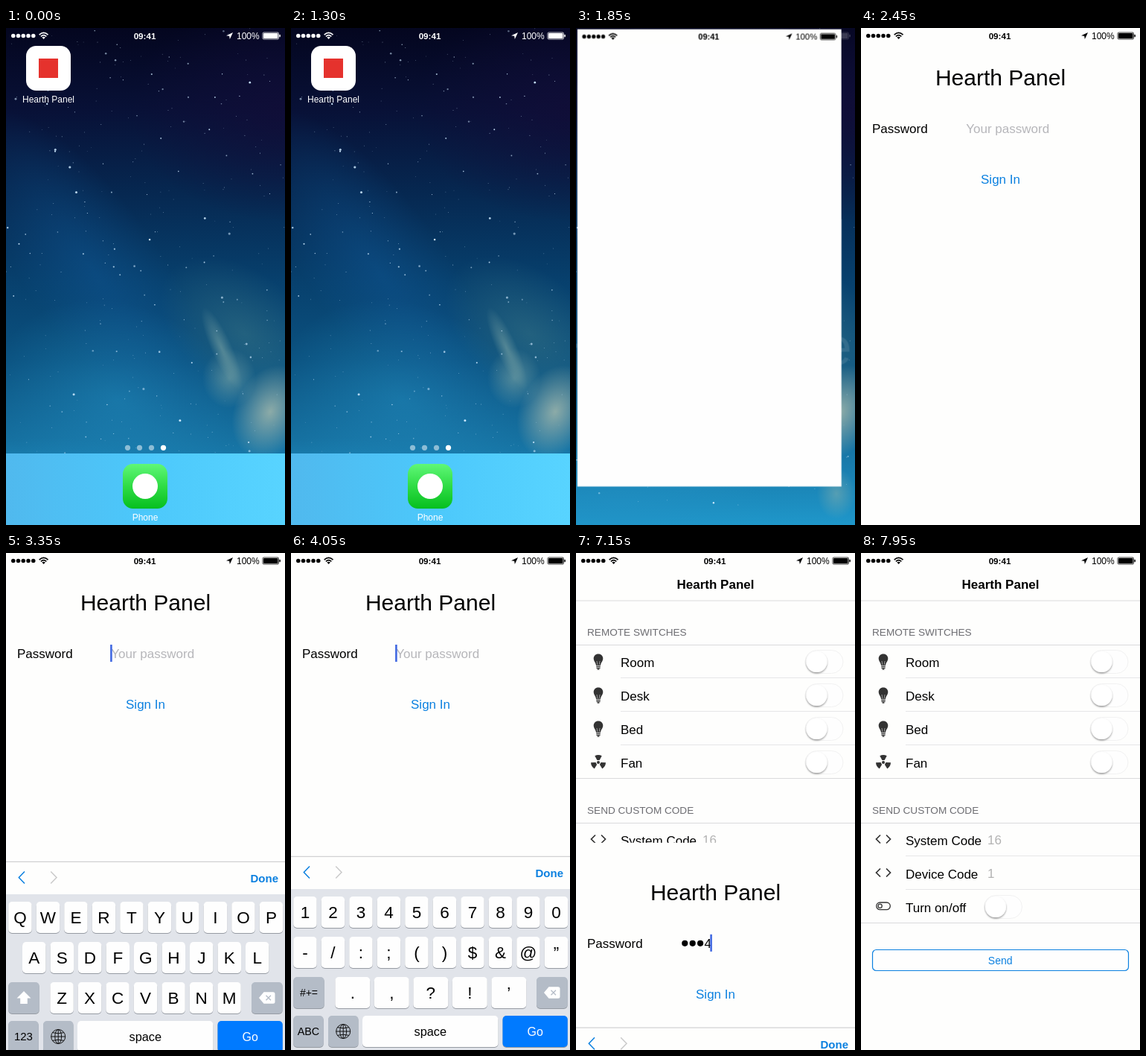
An HTML page that plays this animation: 375 px wide and 667 px high, repeating every 8000 ms.

```html
<!DOCTYPE html>
<html lang="en">
<head>
<meta charset="utf-8">
<title>Hearth Panel</title>
<style>
html, body { margin: 0; width: 100%; height: 100%; overflow: hidden; background: #000; }
svg { display: block; width: 100%; height: 100%; }
text { font-family: "Liberation Sans", Arial, sans-serif; white-space: pre; }
.thin { font-family: Inter, "Open Sans", sans-serif; font-weight: 300; }
</style>
</head>
<body>
<svg id="stage" viewBox="0 0 375 667" xmlns="http://www.w3.org/2000/svg"></svg>
<script>
const NAME = 'Hearth Panel';
const BLUE = '#0b80e0', PAGE = '#fefefd';
const LOOP = 8000, STEP = 50;

// ---- markup helpers ----
const text = (x, y, s, size, fill = '#000', anchor = 'start', extra = '') =>
  `<text x="${x}" y="${y}" font-size="${size}" fill="${fill}" text-anchor="${anchor}" ${extra}>${s}</text>`;
const rect = (x, y, w, h, fill, r = 0, extra = '') =>
  `<rect x="${x}" y="${y}" width="${w}" height="${h}" rx="${r}" fill="${fill}" ${extra}/>`;
const circle = (x, y, r, fill, extra = '') =>
  `<circle cx="${x}" cy="${y}" r="${r}" fill="${fill}" ${extra}/>`;
const line = (d, stroke, w = 1, extra = '') =>
  `<path d="${d}" fill="none" stroke="${stroke}" stroke-width="${w}" ${extra}/>`;
const glow = (x, y, rx, ry, turn, id) =>
  `<ellipse rx="${rx}" ry="${ry}" transform="translate(${x} ${y}) rotate(${turn})" fill="url(#${id})"/>`;
const radial = (id, color, alpha) =>
  `<radialGradient id="${id}"><stop offset="0" stop-color="${color}" stop-opacity="${alpha}"/>
   <stop offset=".5" stop-color="${color}" stop-opacity="${alpha * .5}"/>
   <stop offset="1" stop-color="${color}" stop-opacity="0"/></radialGradient>`;
const linear = (id, turn, ...colors) =>
  `<linearGradient id="${id}" gradientTransform="rotate(${turn})">${colors.map((c, i) =>
    `<stop offset="${i / (colors.length - 1)}" stop-color="${c}"/>`).join('')}</linearGradient>`;

// ---- home screen ----
function stars() {
  let seed = 11, out = '';
  const rnd = () => (seed = seed * 16807 % 2147483647) / 2147483647;
  for (let i = 0; i < 330; i++) {
    const r = .4 + 1.2 * rnd() ** 5;
    out += circle((rnd() * 375).toFixed(1), (rnd() * 640).toFixed(1), r.toFixed(2), '#cfeaff',
      `opacity="${(.4 + .6 * rnd()).toFixed(2)}"`);
  }
  return out;
}

const wallpaper = () => rect(0, 0, 375, 667, 'url(#sky)') +
  glow(375, 110, 210, 150, 0, 'violet') + glow(120, 330, 90, 260, -35, 'haze') +
  glow(150, 500, 170, 130, 20, 'cyan') + glow(60, 640, 190, 90, 0, 'cyan') +
  glow(320, 410, 130, 80, 40, 'teal') + glow(290, 430, 14, 60, -24, 'mist') +
  glow(300, 470, 36, 40, 0, 'mist') + glow(355, 515, 48, 65, 25, 'cream') +
  glow(350, 625, 26, 34, 0, 'mist') + stars();

function status(color) {
  let out = '';
  for (let i = 0; i < 5; i++) out += circle(9.75 + 6.75 * i, 10.5, 2.75, color);
  out += line('M44.7 9.1Q50.6 3.8 56.5 9.1M46.9 11.3Q50.6 8 54.3 11.3', color, 1.7);
  out += `<path d="M48.3 12.6Q50.6 10.8 52.9 12.6L50.6 15Z" fill="${color}"/>`;
  out += text(186.5, 14.5, '09:41', 11.6, color, 'middle', 'font-weight="bold"');
  out += `<path d="M305 6L300.8 15L300.2 10.8L296 10.2Z" fill="${color}"/>`;
  out += text(310, 14.7, '100%', 12, color);
  out += rect(345, 6, 21.5, 9, 'none', 1.5, `stroke="${color}" stroke-width=".8"`);
  return out + rect(346, 7, 19.5, 7, color, .8) + rect(367.4, 8.7, 1.5, 3.6, color, .7);
}

function home() {
  let out = rect(27, 24, 60, 60, '#fff', 13.5) + rect(44, 41, 26, 26, '#e5322d');
  out += rect(27, 24, 60, 60, '#000', 13.5, 'id="dim" opacity="0"');
  out += text(57, 100, NAME, 12, '#fff', 'middle');
  for (let i = 0; i < 4; i++)
    out += circle(163.5 + 16 * i, 563.3, 3.6, '#fff', `opacity="${i == 3 ? 1 : .5}"`);
  out += rect(0, 571, 375, 96, 'url(#dock)') + rect(157, 585, 60, 60, 'url(#green)', 13.5);
  return out + circle(187, 615, 17, '#fff') + text(187, 661, 'Phone', 12, '#fff', 'middle');
}

// ---- keyboard ----
const ROWS = [461, 515, 569, 621];
const key = (x, row, w, label, size = 22.5, fill = '#fefefe', ink = '#000', extra = '') => {
  const y = ROWS[row];
  return rect(x, y + 1, w, 42, '#969ba3', 5) + rect(x, y, w, 42, fill, 5, extra) +
    text(x + w / 2, y + 21 + size * .36, label, size, ink, 'middle');
};
const GREY = '#b4bcc7';
const keyRow = (chars, row, x, pitch = 37.5, w = 31.5) =>
  chars.map((c, i) => key(x + pitch * i, row, w, c)).join('');

const letters = () => keyRow([...'QWERTYUIOP'], 0, 3.2) + keyRow([...'ASDFGHJKL'], 1, 22) +
  keyRow([...'ZXCVBNM'], 2, 59.3) + key(3.2, 2, 41.5, '', 15, GREY) +
  '<path d="M24 581L33.5 590.5H28.8V598H19.2V590.5H14.5Z" fill="#fff"/>' +
  key(3.2, 3, 40.5, '123', 15, GREY);

const numbers = () => keyRow([...'1234567890'], 0, 3.2) +
  keyRow(['-', '/', ':', ';', '(', ')', '$', '&amp;', '@', '”'], 1, 3.2) +
  keyRow(['.', ',', '?', '!', '’'], 2, 59.3, 52.5, 47) +
  key(3.2, 2, 41.5, '#+=', 14, GREY) + key(3.2, 3, 40.5, 'ABC', 14.3, GREY, '#000', 'id="abc"');

function keyboard() {
  let out = rect(0, 407, 375, 260, PAGE) + rect(0, 451, 375, 216, '#e1e4ea');
  out += line('M0 407.3H375', '#c6c6c8');
  out += line('M25 420.5L17.3 428.5L25 436.5', BLUE, 1.5) + line('M60.2 420.5L68 428.5L60.2 436.5', '#cacaca', 1.5);
  out += text(366, 435, 'Done', 15, BLUE, 'end', 'font-weight="bold"');
  out += `<g id="letters">${letters()}</g><g id="numbers">${numbers()}</g>`;
  out += key(330, 2, 41.7, '', 15, GREY) +
    '<path d="M340 590L346.5 582.3H359Q361.5 582.3 361.5 584.8V595.2Q361.5 597.7 359 597.7H346.5Z" fill="#fff"/>' +
    line('M349.5 586.8L356 593.2M356 586.8L349.5 593.2', GREY, 1.3);
  out += key(50, 3, 40.5, '', 15, GREY) + circle(70.2, 642, 9.5, 'none', 'stroke="#111"') +
    '<ellipse cx="70.2" cy="642" rx="4.4" ry="9.5" fill="none" stroke="#111"/>' +
    line('M70.2 632.5V651.5M60.7 642H79.7M62.5 636.6Q70.2 639 77.9 636.6M62.5 647.4Q70.2 645 77.9 647.4', '#111');
  out += key(96, 3, 182.5, 'space', 16.3) + key(284.5, 3, 87.3, 'Go', 16, '#007aff', '#fff');
  return out + '<g id="popup"></g>';
}

function balloon(n) {
  const x = 3.2 + 37.5 * (n - 1), r = x + 31.5;
  const a = Math.max(2.5, x - 13), b = r + 13, mid = (a + b) / 2;
  return `<path d="M${a + 8} 396H${b - 8}Q${b} 396 ${b} 404V441Q${b} 447 ${b - 6} 451Q${r} 456 ${r} 463
    V498Q${r} 503 ${r - 5} 503H${x + 5}Q${x} 503 ${x} 498V463Q${x} 456 ${Math.max(a, x - 7)} 451Q${a} 447 ${a} 441
    V404Q${a} 396 ${a + 8} 396Z" fill="#fefefe" filter="url(#shade)"/>` +
    text(mid, 438, n, 38, '#000', 'middle', 'class="thin"');
}

// ---- app pages ----
const login = () => rect(0, 0, 375, 667, PAGE) + '<g id="form">' +
  text(187.5, 77, NAME, 30, '#000', 'middle') + text(15, 141, 'Password', 17) +
  '<g id="field"></g>' + text(187.5, 209, 'Sign In', 17, BLUE, 'middle', 'id="sign"') + '</g>';

const toggle = (x, y) => rect(x + .5, y - 15.5, 51, 31, '#fefefe', 15.5, 'stroke="#f2f2f2"') +
  circle(x + 16, y, 14, '#fff', 'filter="url(#knob)"');

const bulb = y => `<path d="M30 ${y - 10.5}C33.8 ${y - 10.5} 36.3 ${y - 7.8} 36.3 ${y - 4.4}
  C36.3 ${y - .5} 33.2 ${y + 1.2} 33 ${y + 5}H27C26.8 ${y + 1.2} 23.7 ${y - .5} 23.7 ${y - 4.4}
  C23.7 ${y - 7.8} 26.2 ${y - 10.5} 30 ${y - 10.5}Z" fill="#333"/>` +
  line(`M28.8 ${y + 4.5}L28 ${y - 1}M31.2 ${y + 4.5}L32 ${y - 1}`, '#ddd', .6) +
  line(`M27.2 ${y + 6.4}H32.8M27.4 ${y + 8.3}H32.6M28.6 ${y + 10}H31.4`, '#333', 1.3);

function fan(y) {
  const at = (r, deg) => {
    const a = deg * Math.PI / 180;
    return `${(30 + r * Math.cos(a)).toFixed(2)} ${(y + r * Math.sin(a)).toFixed(2)}`;
  };
  return circle(30, y, 2, '#333') + [-90, 30, 150].map(m =>
    `<path d="M${at(3.5, m - 28)}L${at(10, m - 28)}A10 10 0 0 1 ${at(10, m + 28)}L${at(3.5, m + 28)}Z" fill="#333"/>`).join('');
}

const code = y => line(`M26 ${y - 5.5}L20.5 ${y}L26 ${y + 5.5}M34 ${y - 5.5}L39.5 ${y}L34 ${y + 5.5}`, '#333', 1.7);

function main() {
  const rule = (y, x = 0) => line(`M${x} ${y}H375`, x ? '#e6e6e8' : '#dadadc');
  let out = rect(0, 0, 375, 667, PAGE) + rule(64);
  out += text(187.5, 48, NAME, 17, '#000', 'middle', 'font-weight="bold"');
  out += text(15, 111, 'REMOTE SWITCHES', 13.6, '#6d6d72') + text(15, 350, 'SEND CUSTOM CODE', 13.6, '#6d6d72');
  ['Room', 'Desk', 'Bed', 'Fan'].forEach((s, i) => {
    const y = 146 + 45 * i;
    out += text(60, y + 6.7, s, 17) + toggle(307.5, y) + (i < 3 ? bulb(y) + rule(167.5 + 45 * i, 60) : fan(y));
  });
  out += text(60, 391.7, 'System Code', 17) + text(170, 391.2, '16', 17, '#b2b2b2') + code(384);
  out += text(60, 436.7, 'Device Code', 17) + text(170, 436.2, '1', 17, '#b2b2b2') + code(429);
  out += text(60, 481.7, 'Turn on/off', 17) + toggle(165, 475);
  out += rect(20.7, 469, 18.6, 9.6, 'none', 4.8, 'stroke="#333" stroke-width="1.3"') +
    circle(25.6, 473.8, 2.6, 'none', 'stroke="#333" stroke-width="1.3"');
  out += rule(123.5) + rule(302.5) + rule(362.5) + rule(496.5) + rule(406.5, 60) + rule(451.5, 60);
  out += rect(15.5, 532.5, 344, 28, '#fefefe', 5, `stroke="${BLUE}" stroke-width="1.2"`);
  return out + text(187.2, 551.8, 'Send', 14, BLUE, 'middle');
}

// ---- scene ----
document.getElementById('stage').innerHTML = `<defs>
  ${linear('sky', 90, '#04061f', '#081137', '#062851', '#073f6c', '#0b5280', '#1672a2', '#1f97ca')}
  ${linear('dock', 0, '#50b9ee', '#4cc8fb', '#58d4ff')}
  ${linear('green', 90, '#5ff777', '#2fdc45', '#06bf1e')}
  ${radial('violet', '#120d38', .8)}${radial('haze', '#0f5592', .5)}${radial('cyan', '#2390c4', .45)}
  ${radial('teal', '#3b7583', .5)}${radial('mist', '#8fb3ac', .5)}${radial('cream', '#b5c2ae', .75)}
  <filter id="shade" x="-40%" y="-20%" width="180%" height="140%">
    <feDropShadow dx="0" dy="1" stdDeviation="3" flood-color="#000" flood-opacity=".38"/></filter>
  <filter id="knob" x="-30%" y="-30%" width="160%" height="170%">
    <feDropShadow dx="0" dy="1.5" stdDeviation="1.3" flood-color="#000" flood-opacity=".42"/></filter>
  <clipPath id="window"><rect id="hole" width="375" height="667"/></clipPath></defs>
  ${wallpaper()}<g id="homeBar">${status('#fff')}</g><g id="home">${home()}</g>
  <g id="app"><g clip-path="url(#window)">${rect(0, 0, 375, 667, '#fefefe')}
    <g id="main">${main()}</g><g id="login">${login()}</g><g id="keys">${keyboard()}</g>
    ${rect(0, 0, 375, 20, PAGE)}${status('#000')}</g></g>`;

const el = {};
document.querySelectorAll('#stage [id]').forEach(n => el[n.id] = n);
const set = (id, attr, v) => el[id].setAttribute(attr, v);
const show = (id, on) => set(id, 'display', on ? 'inline' : 'none');
const shift = (id, y) => set(id, 'transform', `translate(0 ${y.toFixed(2)})`);

// ---- motion ----
const clamp = v => Math.min(1, Math.max(0, v));
const ramp = (t, a, b) => clamp((t - a) / (b - a));
// Critically damped spring from 0 to 1.
const spring = (t, start, rate) => {
  const x = Math.max(0, t - start) * rate / 1000;
  return 1 - (1 + x) * Math.exp(-x);
};
const ease = p => p * p * (3 - 2 * p);

// Key press, key release; the digit is the position in the list.
const TAPS = [[4500, 4650], [4900, 5050], [5400, 5550], [5800, 6000]];

function launch(t) {
  const p = t >= 2100 ? 1 : spring(t, 1580, 16.5);
  const w = 60 + 315 * p, h = w * (1 + p * (667 / 375 - 1));
  const x = 27 * (1 - p), y = 24 * (1 - p), k = w / 60, s = w / 375;
  set('home', 'transform', `translate(${x - 27 * k} ${y - 24 * k}) scale(${k})`);
  set('home', 'opacity', 1 - .95 * p);
  set('homeBar', 'opacity', 1 - .85 * p);
  set('dim', 'opacity', t >= 1500 && p < .3 ? .35 : 0);
  show('app', p > 0);
  set('app', 'transform', `translate(${x} ${y}) scale(${s})`);
  set('app', 'opacity', clamp(p * 4));
  set('hole', 'height', h / s);
  set('hole', 'rx', 13.5 * (1 - p) ** 2 / s);
}

function field(t) {
  const n = TAPS.filter(tap => t >= tap[1]).length;
  let out = '', x = 141.3;
  if (!n) out = text(141.3, 141, 'Your password', 17, '#b6b6ba');
  else {
    for (let i = 1; i < n; i++, x += 10.4) out += circle(x + 5, 135, 4.1, '#000');
    out += text(x, 141, n, 17);
    x += 9;
  }
  if (t >= 2950) out += rect(x - 1.2, 123, 2.6, 23, '#4169e1');
  el.field.innerHTML = out;
}

function draw(t) {
  launch(t);
  const leaving = t >= 6900;
  show('main', leaving);
  shift('login', 667 * ease(ramp(t, 6900, 7350)));
  show('login', t >= 2100 && t < 7400);
  set('form', 'opacity', ramp(t, 2100, 2450));
  set('sign', 'opacity', t < 6350 ? 1 : .25 + .75 * ramp(t, 6400, 6650));
  field(t);

  const rise = leaving ? 1 - spring(t, 6880, 13.7) : spring(t, 2950, 13.7);
  show('keys', t >= 2950 && t < 7550);
  shift('keys', 260 * (1 - rise));
  show('letters', t < 3900);
  show('numbers', t >= 3900);
  set('abc', 'fill', t < 4050 ? '#fefefe' : GREY);
  const tap = TAPS.findIndex(([a, b]) => t >= a && t < b);
  el.popup.innerHTML = tap < 0 ? '' : balloon(tap + 1);
}

const began = performance.now();
function frame() {
  const t = (performance.now() - began) % LOOP;
  draw(Math.floor(t / STEP) * STEP);
  requestAnimationFrame(frame);
}
frame();
</script>
</body>
</html>
```
